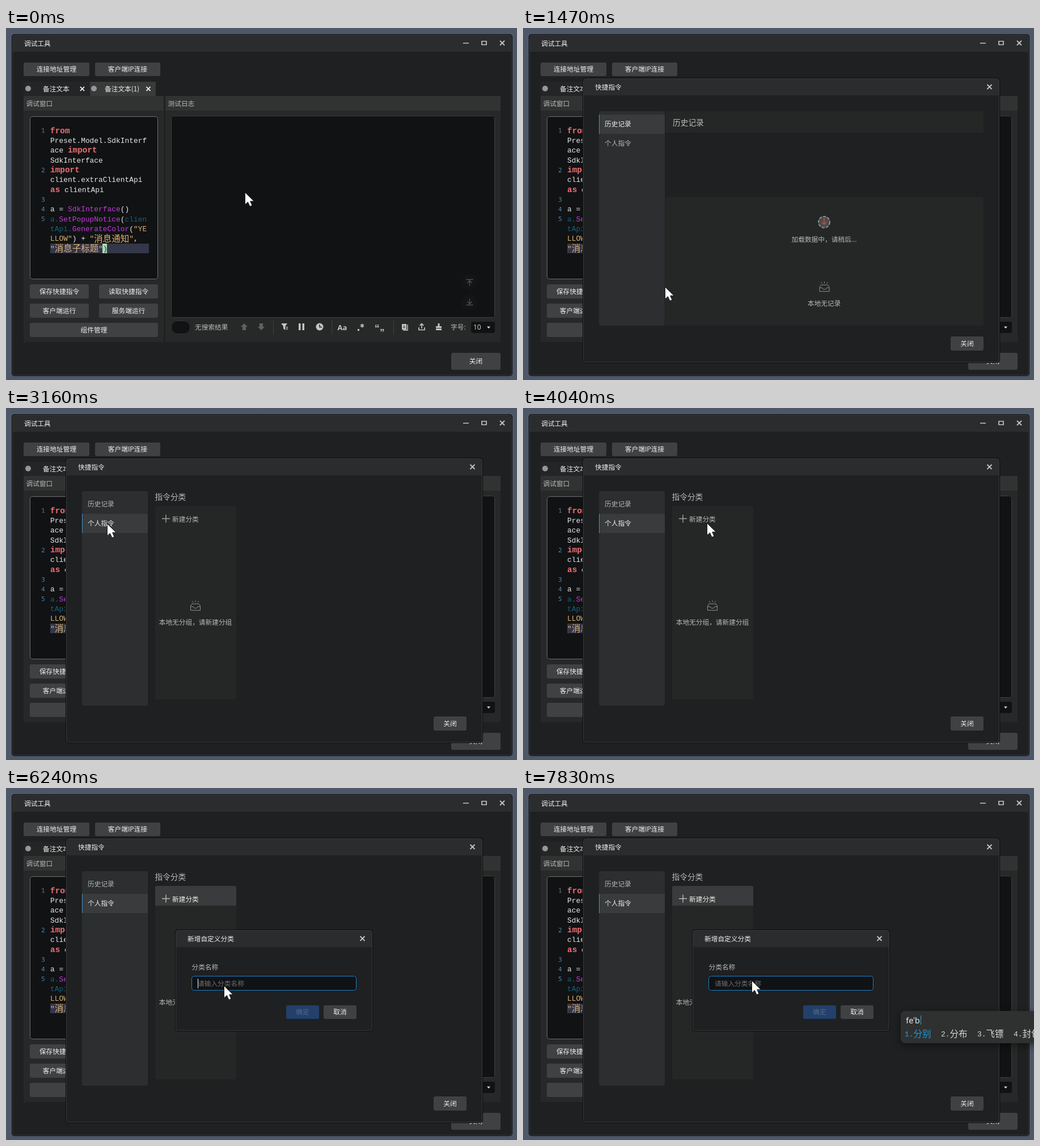
An HTML page with a canvas for the animation above (8000 ms loop, 901 by 622 pixels).

```html
<!DOCTYPE html>
<html lang="zh-CN">
<head>
<meta charset="utf-8">
<style>
html, body { margin: 0; width: 100%; height: 100%; overflow: hidden; background: #4d5767; }
canvas { display: block; width: 901px; height: 622px; }
</style>
</head>
<body>
<canvas id="stage" width="901" height="622"></canvas>
<script>
const ctx = document.getElementById('stage').getContext('2d');
const LOOP = 8000;
const CJK = '"Noto Sans CJK SC", "Noto Sans CJK", "Noto Sans CJK JP", sans-serif';
const MONO = '"Liberation Mono", "Noto Sans CJK SC", monospace';
const C = {
  win: '#1e2021', bar: '#2b2c2e', panel: '#272929', head: '#313332', pane: '#242725',
  field: '#111214', button: '#3f4142', hover: '#4a4c4d', row: '#393b3c',
  white: '#f0f0f0', soft: '#b8b9b9', icon: '#c4c5c5', dim: '#5e6062', focus: '#1a7fca'
};

// Drawing helpers
function box(x, y, w, h, fill, r = 0, stroke) {
  ctx.beginPath();
  ctx.roundRect(x, y, w, h, r);
  ctx.fillStyle = fill;
  ctx.fill();
  if (!stroke) return;
  ctx.beginPath();
  ctx.roundRect(x + .5, y + .5, w - 1, h - 1, r);
  ctx.strokeStyle = stroke;
  ctx.lineWidth = 1;
  ctx.stroke();
}

function text(str, x, cy, color = C.white, size = 11.7, align = 'left', family = CJK, weight = '') {
  ctx.font = `${weight} ${size}px ${family}`;
  ctx.textAlign = align;
  ctx.fillStyle = color;
  ctx.fillText(str, x, cy + size * .37);
}

function path(d, x, y, color, width) {
  ctx.save();
  ctx.translate(x, y);
  const shape = new Path2D(d);
  if (width) {
    ctx.strokeStyle = color;
    ctx.lineWidth = width;
    ctx.stroke(shape);
  } else {
    ctx.fillStyle = color;
    ctx.fill(shape);
  }
  ctx.restore();
}

function disc(x, y, r, color) {
  ctx.beginPath();
  ctx.arc(x, y, r, 0, Math.PI * 2);
  ctx.fillStyle = color;
  ctx.fill();
}

function button(label, x, y, w, h, fill = C.button, color = C.white) {
  box(x, y, w, h, fill, 3);
  text(label, x + w / 2, y + h / 2, color, 11.7, 'center');
}

const cross = (x, y, r = 4, color = C.icon) =>
  path(`M${-r} ${-r}L${r} ${r}M${r} ${-r}L${-r} ${r}`, x, y, color, 1.8);

function frame(title, x, y, w, h, titleX) {
  box(x - 1, y - 1, w + 2, h + 2, '#0a0b0c', 5);
  box(x, y, w, h, C.win, 4, '#3a3c3d');
  box(x + 1, y + 1, w - 2, 29, C.bar, [3, 3, 0, 0]);
  text(title, titleX, y + 15.5);
}

function inbox(x, y) {
  path('M-8.5 1L-6-3H6L8.5 1V8.5H-8.5ZM-8.5 2H-4Q-3 5 0 5T4 2H8.5M0-9V-6M-6-8L-4-5.5M6-8L4-5.5', x, y, '#8b8e8c', 1);
}

// Code editor
const KEY = '#ec6f74', FN = '#c23bd8', REF = '#12617c', STR = '#dcb272', PLAIN = '#e8e8e8';
const code = [
  [['from', KEY]],
  [['Preset.Model.SdkInterf', PLAIN]],
  [['ace ', PLAIN], ['import', KEY]],
  [['SdkInterface', PLAIN]],
  [['import', KEY]],
  [['client.extraClientApi', PLAIN]],
  [['as', KEY], [' clientApi', PLAIN]],
  [],
  [['a = ', PLAIN], ['SdkInterface', FN], ['()', PLAIN]],
  [['a.', REF], ['SetPopupNotice', FN], ['(', PLAIN], ['clien', REF]],
  [['tApi.', REF], ['GenerateColor', FN], ['(', PLAIN], ['"YE', STR]],
  [['LLOW"', STR], [') + ', PLAIN], ['"', STR], ['消息通知', STR], ['"', STR], [',', PLAIN]],
  [['"', STR], ['消息子标题', STR], ['"', STR], [')', '#26372c']]
];
const numberedRows = [0, 4, 7, 8, 9];

function editor() {
  const rowY = i => 181.6 + 17.33 * i;
  box(42, 156, 226, 288, C.field, 4, '#6c6e70');
  box(78, 381, 174, 17, '#34364a');
  box(170, 381, 8, 17, '#a9d8b6');
  numberedRows.forEach((row, i) =>
    text(i + 1, 69, rowY(row) - .5, i ? '#5585a6' : '#727a80', 11.5, 'right', '"Noto Sans Mono", monospace'));
  ctx.textAlign = 'left';
  code.forEach((tokens, i) => {
    let x = 78;
    for (const [word, color] of tokens) {
      const wide = word.charCodeAt(0) > 255, bold = color === KEY;
      ctx.font = wide ? `15.5px ${CJK}` : bold ? `bold 14.4px ${MONO}` : `12.9px ${MONO}`;
      ctx.fillStyle = color;
      ctx.fillText(word, x, rowY(i) + (wide ? 5.4 : 4.2));
      x += ctx.measureText(word).width;
    }
  });
}

function logTools() {
  const y = 529;
  box(291, 517, 34, 24, C.field, 11, '#343638');
  text('无搜索结果', 333, y, C.soft);
  path('M0-6L6 0H3V6H-3V0H-6Z', 420, y - 1, C.dim);
  path('M0 6L6 0H3V-6H-3V0H-6Z', 450, y - 1, C.dim);
  for (const x of [471, 574, 683]) box(x, 516, 1, 26, '#3d3f40');
  path('M-6-6H5L1.5-1V6L-2 3V-1ZM3 0H6V1.5H3ZM3 3H6V4.5H3Z', 491, y - 1, C.icon);
  path('M-5-6H-1.5V6H-5ZM1.5-6H5V6H1.5Z', 521, y - 1, C.icon);
  disc(553, y - 1, 6.5, C.icon);
  path('M0-4V.5H4', 553, y - 1, C.win, 1.5);
  text('Aa', 593, y, C.icon, 13, 'center', '"Open Sans", sans-serif', 'bold');
  box(620, 532, 3, 3, C.icon);
  path('M0-3.5V3.5M-3-1.8L3 1.8M3-1.8L-3 1.8', 628, 526, C.icon, 1.4);
  text('“', 650, y + 1, C.icon, 17, 'left', '"Liberation Sans", sans-serif', 'bold');
  text('„', 659, y - 1, C.icon, 17, 'left', '"Liberation Sans", sans-serif', 'bold');
  box(698, 523, 8, 10, C.icon, 1);
  path('M-2 7H6V-3', 702, 527, C.icon, 1.5);
  path('M-2-1H2M-2 1.5H2', 702, 528, C.win, 1);
  path('M-5 1V5.5H5V1M0 3V-5M-3.5-2L0-5.5L3.5-2', 733, 528, C.icon, 1.7);
  path('M-1.5-6H1.5V-1H5V2H-5V-1H-1.5ZM-5 3H5V6H-5Z', 763, 528, C.icon);
  text('字号:', 784, y, C.soft);
  box(820, 519, 42, 20, C.field, 3);
  text('10', 824, y, '#d5d5d5', 12, 'left', '"Open Sans", sans-serif');
  path('M-3-1.5H3L0 2Z', 851, y, '#e0e0e0');
}

function mainWindow(t) {
  box(0, 0, 901, 622, '#4d5767');
  frame('调试工具', 11, 12, 881, 602, 32);
  box(806, 26, 10, 1.5, C.icon);
  path('M-4-3H4V3H-4Z', 843, 26.5, C.icon, 1.7);
  cross(875, 26.5);
  button('连接地址管理', 31, 61, 116, 24);
  button('客户端IP连接', 157, 61, 115, 24);

  box(31, 95, 116, 25, '#232526');
  box(148, 95, 116, 25, '#393b3b');
  disc(39, 107, 5, '#969797');
  disc(155, 107, 5, '#969797');
  text('备注文本', 65, 108);
  text('备注文本(1)', 174, 108);
  cross(134.5, 107.5, 3.6, C.white);
  cross(251, 107.5, 3.6, C.white);

  for (const [x, w, label] of [[31, 247, '调试窗口'], [281, 591, '测试日志']]) {
    box(x, 120, w, 435, C.panel);
    box(x, 120, w, 26, C.head);
    text(label, x + 4.5, 133.5, C.soft);
  }
  editor();
  button('保存快捷指令', 42, 453, 104, 25);
  button('读取快捷指令', 164, 453, 104, 25, t >= 1340 ? C.hover : C.button);
  button('客户端运行', 42, 487, 104, 25);
  button('服务端运行', 164, 487, 104, 25);
  button('组件管理', 42, 521, 226, 25);

  box(291, 155, 571, 357, C.field, 4, '#3c3e40');
  disc(817, 449, 14, '#141516');
  disc(817, 485, 14, '#141516');
  path('M-6-5H6M0 6V-3M-4 1L0-3L4 1', 817.5, 449.5, '#505254', 1.3);
  path('M-6 5H6M0-6V3M-4-1L0 3L4-1', 817.5, 484.5, '#505254', 1.3);
  logTools();
  button('关闭', 785, 574, 87, 30);
}

// Dialogs
function historyPage(loading) {
  box(251, 147, 561, 38, C.pane);
  text('历史记录', 264, 167, C.soft, 13.7);
  if (loading) {
    box(251, 299, 561, 227, C.pane, 3);
    disc(531, 343, 10.5, '#4a4c4b');
    ctx.setLineDash([5, 2.5]);
    path('M10 0A10 10 0 1 1-10 0A10 10 0 1 1 10 0', 531, 343, '#8b8e8c', 2);
    ctx.setLineDash([]);
    path('M0-6V5M-4 1L0 5L4 1', 531, 342, '#b4533f', 1.5);
    text('加载数据中，请稍后...', 531, 373.5, C.soft, 11.7, 'center');
  } else {
    box(251, 185, 561, 341, C.pane);
  }
  const y = loading ? 457 : 343;
  inbox(531.5, y);
  text('本地无记录', 531, y + 30, C.soft, 11.7, 'center');
}

function categoryPage(hovered) {
  text('指令分类', 262.5, 157, C.soft, 13.7);
  box(263, 173, 143, 342, C.pane, 3);
  if (hovered) box(263, 173, 143, 35, C.row, [3, 3, 0, 0]);
  path('M-7 0H7M0-7V7', 282, 195.5, hovered ? '#b9bcba' : '#9ba69c', 1.4);
  text('新建分类', 293, 196.5, hovered ? C.white : C.soft);
  inbox(334, 349);
  text('本地无分组，请新建分组', 334, 378.5, C.soft, 11.7, 'center');
}

function commandDialog(t) {
  const personal = t >= 3160;
  frame('快捷指令', 106, 89, 734, 502, 127);
  cross(822.5, 104);
  box(134, 147, 116, 379, '#2c2e2f', 3);
  const y = personal ? 187 : 153;
  box(134, y, 116, 34, C.row);
  box(134, y, 1, 34, '#4193c9');
  text('历史记录', 144, 170, personal ? C.soft : C.white);
  text('个人指令', 144, 204, personal ? C.white : C.soft);
  if (personal) categoryPage(t >= 4570);
  else historyPage(t < 1540);
  button('关闭', 754, 545, 58, 25);
}

function nameDialog(t) {
  const focused = t >= 6240;
  frame('新增自定义分类', 299, 251, 347, 178, 320);
  cross(628.5, 266);
  text('分类名称', 327.5, 316.5, C.soft);
  box(327, 332, 291, 26, C.field, 4, focused ? C.focus : '#454749');
  text('请输入分类名称', 338, 345.5, '#6d6f71');
  const caretOn = focused && Math.floor((t - 6240) / 530) % 2 === 0;
  if (caretOn) box(338, 337, 1, 17, C.white);
  button('确定', 494, 384, 58, 24, '#233f6b', '#566a88');
  button('取消', 560, 384, 58, 24);
}

// Input method popup
const typing = [
  [7630, 'f', ['分', '发', '放', '非']],
  [7730, 'fe', ['飞', '非', '费', '分']],
  [7830, "fe'b", ['分别', '分布', '飞镖', '封包']]
];

function inputMethod(t) {
  const step = typing.filter(s => t >= s[0]).pop();
  if (!step) return;
  const [, typed, words] = step;
  ctx.save();
  ctx.shadowColor = 'rgba(0,0,0,.45)';
  ctx.shadowBlur = 14;
  ctx.shadowOffsetY = 4;
  box(666, 394, 260, 57, '#2f3131', 8);
  ctx.restore();
  text(typed, 675, 410, '#dedede', 15.5, 'left', 'Roboto, sans-serif');
  box(Math.round(676 + ctx.measureText(typed).width), 402, 1, 16, '#2a9fe0');
  let x = 673;
  words.forEach((word, i) => {
    const color = i ? '#d6d6d6' : '#1f9bd8';
    text(`${i + 1}.`, x, 434.5, color, 12.9, 'left', MONO);
    text(word, x + 15.5, 434.5, color, 15.5);
    x += 33 + ctx.measureText(word).width;
  });
}

// Pointer moves: start, end, number of steps, destination
const moves = [
  [590, 940, 6, 250, 457],
  [2330, 3090, 11, 178, 204],
  [3620, 4110, 8, 331, 203],
  [5430, 5780, 6, 384, 349],
  [6370, 6440, 2, 400, 340],
  [6700, 6970, 4, 403, 340]
];
const ease = p => p * p * (3 - 2 * p);

function pointerAt(t) {
  let x = 421, y = 290;
  for (const [start, end, steps, toX, toY] of moves) {
    if (t < start) break;
    const step = Math.floor((t - start) / (end - start) * (steps - 1) + 1e-6) + 1;
    const p = ease(Math.min(1, step / steps));
    x += (toX - x) * p;
    y += (toY - y) * p;
  }
  return [Math.round(x), Math.round(y)];
}

function pointer(t) {
  const [x, y] = pointerAt(t);
  const arrow = 'M.5.5V22L5.4 17.5L9 25.3L13 23.6L9.7 16.1H16.3Z';
  path(arrow, x, y, '#ffffff');
  path(arrow, x, y, '#16181a', 1);
}

function draw(t) {
  mainWindow(t);
  if (t >= 1470) commandDialog(t);
  if (t >= 4770) nameDialog(t);
  inputMethod(t);
  pointer(t);
}

const origin = performance.now();
function tick() {
  draw((performance.now() - origin) % LOOP);
  requestAnimationFrame(tick);
}
tick();
</script>
</body>
</html>
```
